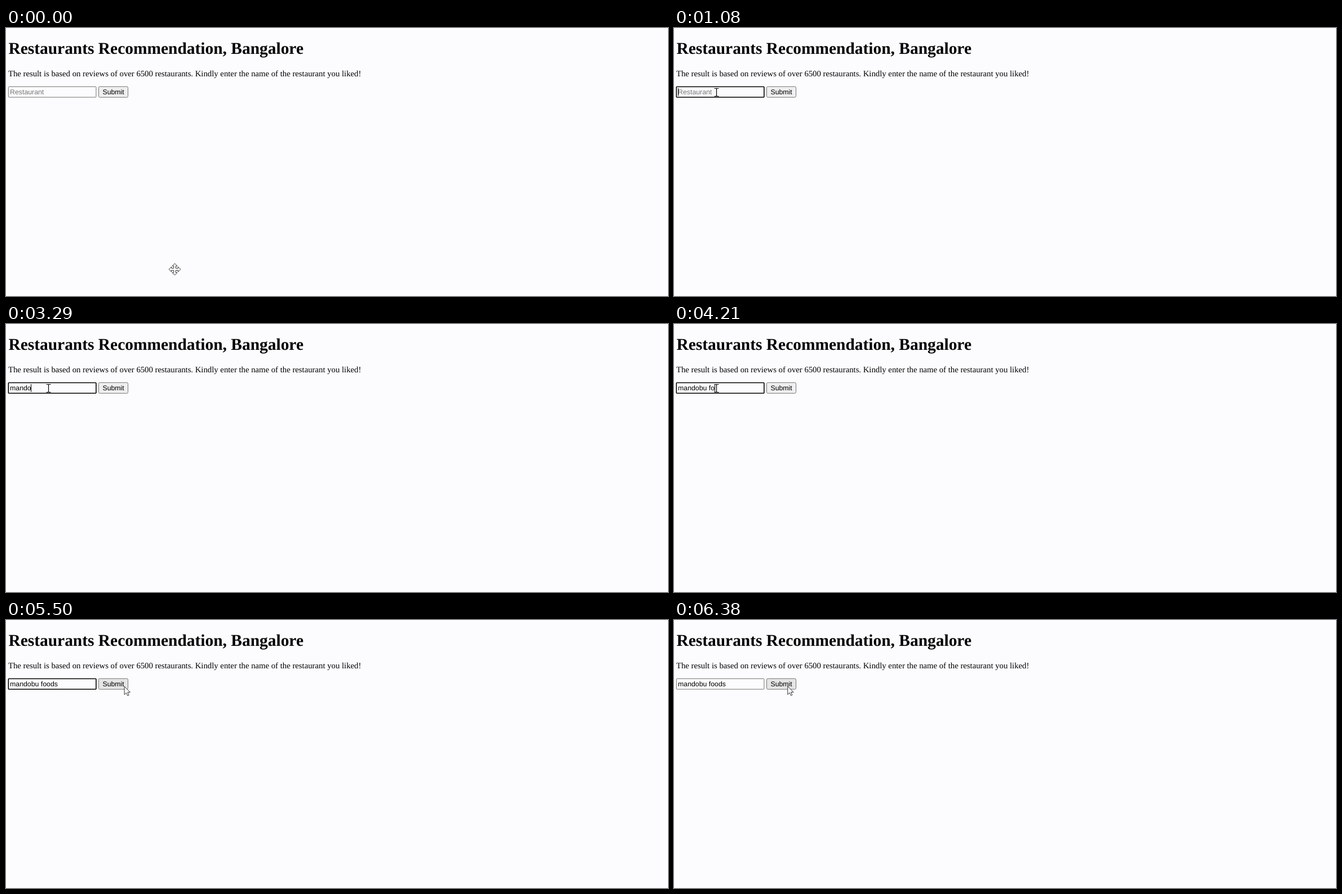
Recreate the animation shown at these times as an HTML page. Size 1175x477 px, loop 8000 ms.

```html
<!DOCTYPE html>
<html lang="en">
<head>
<meta charset="utf-8">
<title>Restaurants Recommendation</title>
<style>
  html, body { margin: 0; width: 100%; height: 100%; overflow: hidden; background: #fcfcfe; }
  svg { display: block; }
  text { text-rendering: geometricPrecision; white-space: pre; }
  .serif { font-family: "Liberation Serif", "Times New Roman", serif; }
  .sans { font: 12.3px "Liberation Sans", Arial, sans-serif; }
  .cursor { fill: #fcfcfe; stroke: #333; }
  #field { stroke: #767676; fill: #fcfcfe; }
  #field.focused { stroke: #000; stroke-width: 1.6; }
  #beam { fill: none; stroke: #000; stroke-width: 1.2; }
</style>
</head>
<body>
<svg width="1175" height="477" viewBox="0 0 1175 477">
  <text class="serif" x="4.4" y="46" font-size="29.45" font-weight="bold">Restaurants Recommendation, Bangalore</text>
  <text class="serif" x="3.9" y="85.5" font-size="14.74">The result is based on reviews of over 6500 restaurants. Kindly enter the name of the restaurant you liked!</text>

  <rect id="field" x="4.3" y="104.5" width="155.6" height="18.7" rx="1"/>
  <text id="value" class="sans" x="7.1" y="118"></text>
  <rect id="caret" y="107" width="1" height="14"/>

  <rect id="button" x="164.5" y="104.3" width="52" height="19" rx="2" stroke="#767676"/>
  <text class="sans" x="190.6" y="118" text-anchor="middle">Submit</text>

  <path class="cursor" id="pan" d="M0-10.5L4.5-5.8H1.8V-1.8H5.8V-4.5L10.5 0L5.8 4.5V1.8H1.8V5.8H4.5L0 10.5L-4.5 5.8H-1.8V1.8H-5.8V4.5L-10.5 0L-5.8-4.5V-1.8H-1.8V-5.8H-4.5Z"/>
  <path class="cursor" id="arrow" d="M.3.5V15.2L3.7 12L6 17L8.3 16L6.1 11H10.6Z"/>
  <path id="beam" d="M-4-7H-1L0-6L1-7H4M0-6V6M-4 7H-1L0 6L1 7H4"/>
</svg>
<script>
const LOOP = 8000, FOCUS = 1000, PRESS = 6080, RELEASE = 6290, BLINK = 540;
const NAME = "mandobu foods";

// Letters appear at an even pace in each burst; the second one retypes two of them.
const BURSTS = [
  { start: FOCUS, pace: 0, from: 0, to: 0 },
  { start: 1630, pace: 227, from: 1, to: 5 },
  { start: 2960, pace: 165, from: 3, to: 5 },
  { start: 3500, pace: 161, from: 6, to: NAME.length },
];

const smooth = k => k * k * (3 - 2 * k);
const overshoot = k => 1 + 2.7 * (k - 1) ** 3 + 1.7 * (k - 1) ** 2;

const HOME = { x: 299.5, y: 429.5 };
const MOVES = [
  { start: 90, end: 500, x: 75, y: 123, ease: smooth },
  { start: 500, end: 550, x: 75.5, y: 114.5, ease: smooth },
  { start: 5230, end: 5830, x: 201.5, y: 117.5, ease: overshoot },
];

const ids = ["field", "value", "caret", "button", "pan", "arrow", "beam"];
const el = Object.fromEntries(ids.map(id => [id, document.getElementById(id)]));
const show = (node, on) => node.setAttribute("visibility", on ? "visible" : "hidden");

function pointerAt(t) {
  let { x, y } = HOME;
  for (const move of MOVES) {
    const k = move.ease(Math.min(1, Math.max(0, (t - move.start) / (move.end - move.start))));
    x += (move.x - x) * k;
    y += (move.y - y) * k;
  }
  return { x, y };
}

function typedAt(t) {
  const burst = BURSTS.findLast(b => b.start <= t) || BURSTS[0];
  const { start, pace, from, to } = burst;
  const done = pace ? Math.min(to - from, Math.floor((t - start) / pace)) : 0;
  return { count: from + done, since: start + done * pace };
}

function drawField(t) {
  const focused = t >= FOCUS && t < PRESS;
  const { count, since } = typedAt(t);
  el.value.textContent = count ? NAME.slice(0, count) : "Restaurant";
  el.value.setAttribute("fill", count ? "#000" : "#757575");
  el.field.classList.toggle("focused", focused);
  const width = count ? el.value.getComputedTextLength() : 0;
  el.caret.setAttribute("x", Math.round(6.7 + width));
  show(el.caret, focused && (t - since) % (2 * BLINK) < BLINK);
}

function drawPointer(t) {
  const { x, y } = pointerAt(t);
  const overField = x < 161 && y < 122;
  const shape = t < 130 ? "pan" : overField ? "beam" : "arrow";
  for (const id of ["pan", "arrow", "beam"]) {
    el[id].setAttribute("transform", `translate(${x} ${y})`);
    show(el[id], id === shape);
  }
  const hover = x > 164 && y < 124;
  const pressed = t >= PRESS && t < RELEASE;
  el.button.setAttribute("fill", pressed ? "#f5f5f5" : hover ? "#e5e5e5" : "#efefef");
}

function frame() {
  const t = performance.now() % LOOP;
  drawField(t);
  drawPointer(t);
  requestAnimationFrame(frame);
}
frame();
</script>
</body>
</html>
```
